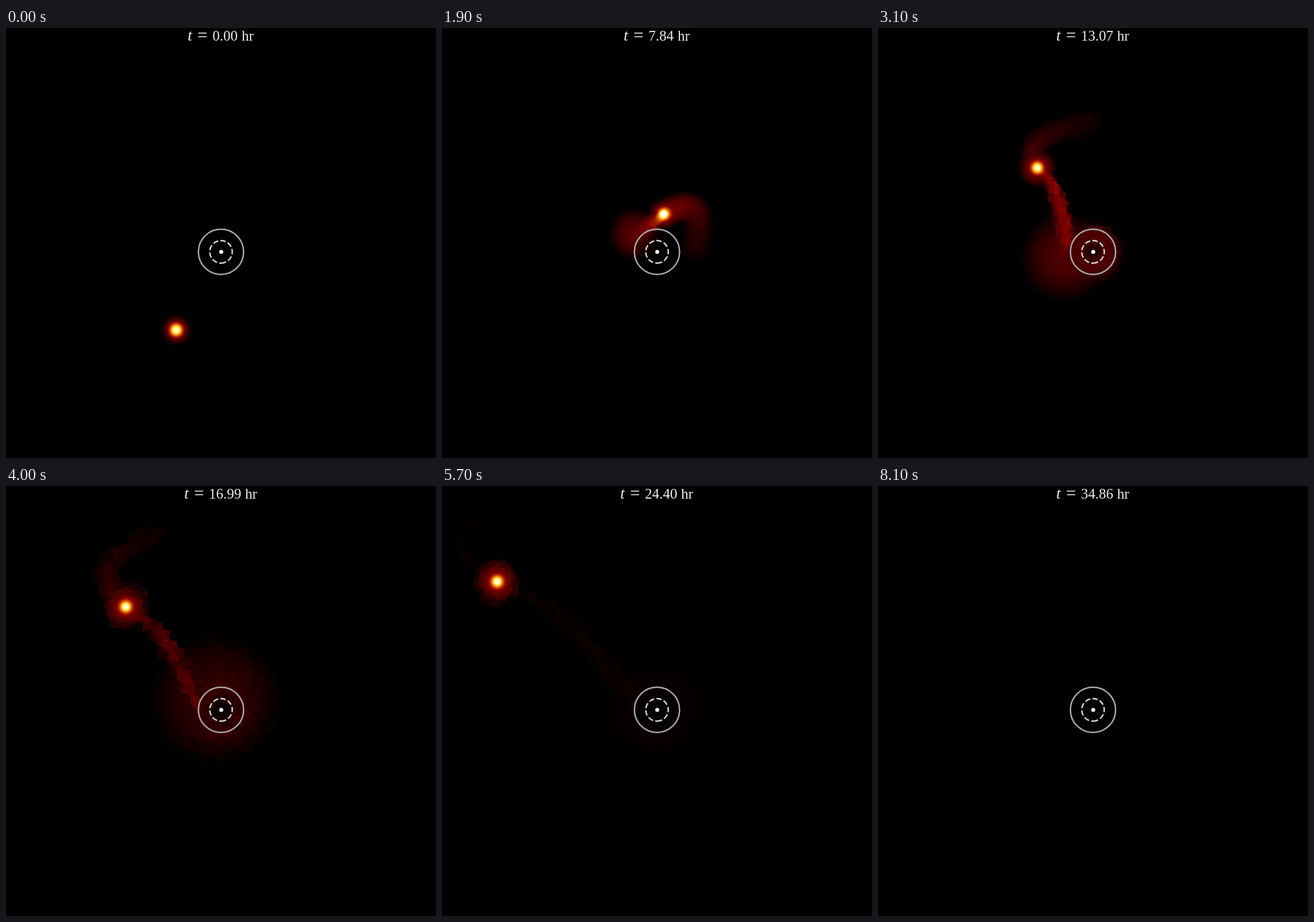
An HTML page with a canvas for the animation above (8200 ms loop, 748 px wide and 748 px high).

```html
<!DOCTYPE html>
<html lang="en">
<head>
<meta charset="utf-8">
<title>Tidal disruption</title>
<style>
  html, body { margin: 0; width: 100%; height: 100%; overflow: hidden; background: #000; }
  canvas, svg { position: absolute; left: 0; top: 0; width: 748px; height: 748px; }
  text { font: 25px "Liberation Serif", "Noto Serif", serif; fill: #eee; }
</style>
</head>
<body>
<canvas id="gas" width="748" height="748"></canvas>
<svg viewBox="0 0 748 748">
  <g fill="none" stroke-width="2.5">
    <circle cx="374" cy="389.4" r="39.3" stroke="#ababab"/>
    <path d="M374 409a19.6 19.6 0 0 0 0-39.2a19.6 19.6 0 0 0 0 39.2" stroke="#d8d8d8" stroke-dasharray="9.25 4"/>
  </g>
  <circle cx="374.4" cy="389.4" r="3.4" fill="#fff"/>
  <text id="symbol" y="22" style="font-size:28px;font-style:italic">t</text>
  <text id="equals" y="23" style="font-size:31px">=</text>
  <text id="hours" x="381" y="22" text-anchor="middle"></text>
  <text id="unit" y="22">hr</text>
</svg>
<script>
const SIZE = 748, LEFT = 20, TOP = 30, BOTTOM = 570;
const LOOP = 8200, HOURS_PER_STEP = 0.43575;
const HOLE = [374, 389], PERICENTRE = 39.2;

const byId = id => document.getElementById(id);
const lerp = (a, b, u) => a + (b - a) * u;
const mix = (a, b, u) => Array.isArray(a) ? a.map((v, i) => mix(v, b[i], u)) : lerp(a, b, u);
const add = (a, b) => [a[0] + b[0], a[1] + b[1]];
const distance2 = (x, y, [px, py]) => (x - px) ** 2 + (y - py) ** 2;
const smoothstep = (from, to, v) => {
  const u = Math.max(0, Math.min(1, (v - from) / (to - from)));
  return u * u * (3 - 2 * u);
};

// Parabolic orbit: Barker's equation solved in closed form.
function starAt(step) {
  const m = 1.5 * (step * 0.25 - 3.464);
  const c = Math.cbrt(m + Math.sqrt(m * m + 1));
  const d = c - 1 / c;
  return add(HOLE, [PERICENTRE * (1 - d * d), -2 * PERICENTRE * d]);
}

// step, tail bend and tip (from the star), cloud centre (from the hole), cloud radius, cloud heat
const stages = [
  [18, [77, -43], [55, 55], [-39, -31], 46, .17],
  [30, [-35, -57], [90, -78], [-49, 9], 78, .15],
  [39, [-89, -68], [50, -125], [-9, -17], 112, .1],
  [48, [-119, -63], [-10, -135], [-19, -4], 90, .045]
];

function stageAt(step) {
  const next = stages.findIndex(s => s[0] >= step);
  if (next <= 0) return stages[next ? stages.length - 1 : 0];
  const a = stages[next - 1], b = stages[next];
  return mix(a, b, (step - a[0]) / (b[0] - a[0]));
}

// Gas along a quadratic curve; width(u, side) and heat(u) vary along it.
function makeArm(from, bend, to, width, heat) {
  const count = 8, segments = [];
  const point = u => mix(mix(from, bend, u), mix(bend, to, u), u);
  for (let i = 0; i < count; i++) {
    const a = point(i / count), b = point((i + 1) / count);
    const dx = b[0] - a[0], dy = b[1] - a[1];
    segments.push({ a, dx, dy, len2: dx * dx + dy * dy || 1 });
  }
  return (x, y) => {
    let best = 0;
    segments.forEach(({ a, dx, dy, len2 }, i) => {
      const px = x - a[0], py = y - a[1];
      const along = Math.max(0, Math.min(1, (px * dx + py * dy) / len2));
      const u = (i + along) / count;
      const d2 = (px - along * dx) ** 2 + (py - along * dy) ** 2;
      const fall = 1 - d2 / width(u, dx * py - dy * px) ** 2;
      if (fall > 0) best = Math.max(best, heat(u) * fall);
    });
    return best;
  };
}

function makeField(step) {
  const star = starAt(step);
  const [, bend, tip, centre, reach, cloudHeat] = stageAt(step);
  const growth = smoothstep(11, 18, step), fade = 1 - smoothstep(46, 62, step);
  const strength = growth * fade, age = Math.max(0, step - 18);

  const tailHeat = .24 * Math.exp(-age / 32) * strength;
  const tailWidth = 34 - .36 * step;
  const tail = makeArm(star, add(star, mix([0, 0], bend, growth)), add(star, mix([0, 0], tip, growth)),
    () => tailWidth, u => tailHeat * (1 - .75 * u));

  // The stream is sharp towards the hole and diffuse on its outer side.
  const streamHeat = .42 * Math.exp(-age / 22) * strength;
  const cooling = .6 * (1 - smoothstep(18, 30, step));
  const streamEnd = mix(star, add(HOLE, [-42, -20]), growth);
  const streamBend = [lerp(HOLE[0], star[0], .5), lerp(HOLE[1], star[1], .8)];
  const stream = makeArm(star, mix(star, streamBend, growth), streamEnd,
    (u, side) => side > 0 ? lerp(12, 34, u) : 10, u => streamHeat * (1 - cooling * u));

  const cloudCentre = mix(star, add(HOLE, centre), growth);
  const ringHeat = cloudHeat * smoothstep(20, 30, step), ringRadius = step - 2;
  const haloSize = lerp(27, 40, smoothstep(18, 40, step));
  const haloHeat = lerp(.2, .25, smoothstep(18, 40, step));

  return (x, y) => {
    const halo = haloHeat * Math.max(0, 1 - distance2(x, y, star) / haloSize ** 2);
    if (!strength) return halo;
    const fromHole = Math.sqrt(distance2(x, y, HOLE));
    const cloud = cloudHeat * (1 - distance2(x, y, cloudCentre) / reach ** 2) * Math.min(1, fromHole / 40);
    const ring = ringHeat * (1 - ((fromHole - ringRadius) / 26) ** 2);
    return Math.max(halo, strength * cloud, strength * ring, tail(x, y), stream(x, y));
  };
}

function random(seed) {
  const v = Math.sin(seed * 12.9898 + 4.137) * 43758.5453;
  return v - Math.floor(v);
}

// Mosaic of Voronoi cells around the jittered points of a square grid.
function makeMosaic(cell) {
  const cols = Math.ceil(SIZE / cell) + 2, count = cols * cols;
  const xs = new Float32Array(count), ys = new Float32Array(count), grain = new Float32Array(count);
  for (let i = 0; i < count; i++) {
    xs[i] = (i % cols - 1 + random(i)) * cell;
    ys[i] = (Math.floor(i / cols) - 1 + random(i + .37)) * cell;
    grain[i] = 1 + .02 * cell * (random(i + .71) - .5);
  }
  const owner = new Int32Array(SIZE * SIZE);
  for (let y = TOP; y < BOTTOM; y++) for (let x = LEFT; x < SIZE; x++) {
    const col = Math.floor(x / cell) + 1, row = Math.floor(y / cell) + 1;
    let best = 1e9;
    for (let r = row - 1; r <= row + 1; r++) for (let c = col - 1; c <= col + 1; c++) {
      const i = r * cols + c, d = (xs[i] - x) ** 2 + (ys[i] - y) ** 2;
      if (d < best) { best = d; owner[y * SIZE + x] = i; }
    }
  }
  return { xs, ys, grain, owner, heat: new Float32Array(count) };
}

const fine = makeMosaic(4), medium = makeMosaic(8), coarse = makeMosaic(13);

const context = byId("gas").getContext("2d");
const image = context.createImageData(SIZE, SIZE);
const pixels = image.data;
for (let i = 3; i < pixels.length; i += 4) pixels[i] = 255;

function drawGas(step) {
  const field = makeField(step), [sx, sy] = starAt(step);
  const core = lerp(10.3, 9, Math.min(1, step / 18));
  const base = step < 22 ? fine : step < 35 ? medium : coarse;
  const near = step < 35 ? fine : medium;
  for (const m of [fine, medium, coarse]) m.heat.fill(-1);
  for (let y = TOP; y < BOTTOM; y++) for (let x = LEFT; x < SIZE; x++) {
    const p = y * SIZE + x, d2 = (x - sx) ** 2 + (y - sy) ** 2;
    let heat;
    if (d2 < 324) heat = field(x, y);
    else {
      const m = d2 < 1400 ? near : base, i = m.owner[p];
      if (m.heat[i] < 0) m.heat[i] = field(m.xs[i], m.ys[i]) * m.grain[i];
      heat = m.heat[i];
    }
    if (d2 < 900) heat += .7 * Math.exp(-d2 / (core * core));
    const red = heat * 510;
    pixels[p * 4] = red;
    pixels[p * 4 + 1] = red - 127;
    pixels[p * 4 + 2] = red - 255;
  }
  context.putImageData(image, 0, 0);
}

function drawLabel(step) {
  const label = (step * HOURS_PER_STEP).toFixed(2);
  const shift = label.length > 4 ? 6 : 0;
  byId("symbol").setAttribute("x", 316 - shift);
  byId("equals").setAttribute("x", 333 - shift);
  byId("hours").textContent = label;
  byId("unit").setAttribute("x", 410 + shift);
}

let shown = -1;
const start = performance.now();
function update() {
  const time = (performance.now() - start) % LOOP;
  const step = Math.max(0, Math.floor(time / 100) - 1);
  if (step !== shown) {
    shown = step;
    drawGas(step);
    drawLabel(step);
  }
  requestAnimationFrame(update);
}
update();
</script>
</body>
</html>
```
